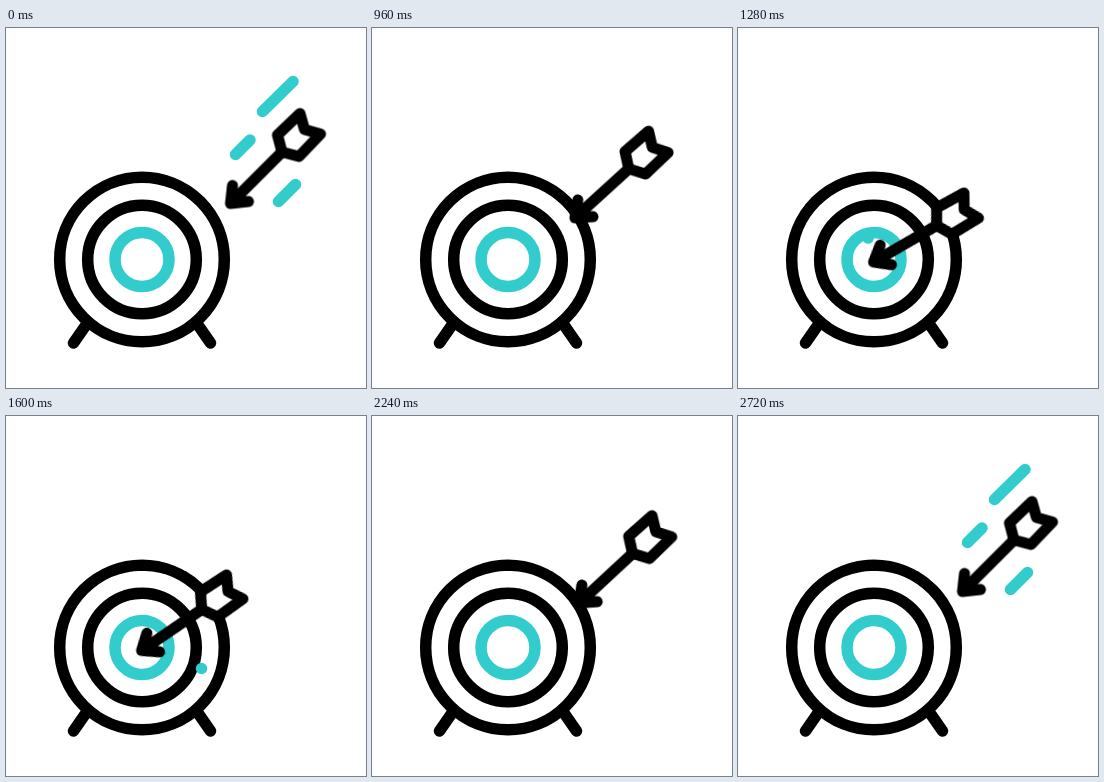
Write an HTML page that moves like this. It is 360x360 px and loops after 2760 ms.

```html
<!DOCTYPE html>
<html lang="en">
<head>
<meta charset="utf-8">
<title>Arrow and target</title>
<style>
  html, body { margin: 0; width: 100%; height: 100%; overflow: hidden; background: #fff; }
  svg {
    display: block; width: 100%; height: 100%;
    fill: none; stroke: #000; stroke-width: 11.5;
    stroke-linecap: round; stroke-linejoin: round;
  }
  .teal { stroke: #33cccc; }
  .arrow, .streak, .spark { animation: 2760ms linear infinite; }

  /* The arrow's own origin is its tip, so it quivers around the hit point. */
  .arrow { animation-name: fly; stroke-width: 11; }
  @keyframes fly {
    0% { transform: translate(224.5px, 175.5px) rotate(0deg); }
    23.19% {
      transform: translate(224.5px, 175.5px) rotate(0deg);
      animation-timing-function: cubic-bezier(.45, 0, .8, .4);
    }
    43.91% {
      transform: translate(135.6px, 234.5px) rotate(11deg);
      animation-timing-function: ease-out;
    }
    46.09% { transform: translate(135.6px, 234px) rotate(15deg); animation-timing-function: ease-in-out; }
    50.43% { transform: translate(135.6px, 234.5px) rotate(8.6deg); animation-timing-function: ease-in-out; }
    54.78% { transform: translate(135.6px, 234.5px) rotate(12.3deg); animation-timing-function: ease-in-out; }
    59.13% { transform: translate(135.6px, 234.5px) rotate(10.4deg); animation-timing-function: ease-in-out; }
    62.32% {
      transform: translate(135.6px, 234.5px) rotate(11deg);
      animation-timing-function: cubic-bezier(.25, 0, .25, 1);
    }
    98.55%, 100% { transform: translate(224.5px, 175.5px) rotate(0deg); }
  }

  .streak { animation-name: streak; }
  @keyframes streak {
    0%, 23.19% { stroke-dasharray: 1 3; visibility: visible; animation-timing-function: ease-in-out; }
    33.3%, 84% { stroke-dasharray: 0 3; visibility: hidden; animation-timing-function: ease-in-out; }
    98.55%, 100% { stroke-dasharray: 1 3; visibility: visible; }
  }

  .spark { animation-name: spark; }
  @keyframes spark {
    0%, 44.9% { stroke-dasharray: 0 3; stroke-dashoffset: 0; visibility: hidden; }
    45% { stroke-dasharray: 0 3; stroke-dashoffset: 0; visibility: visible; animation-timing-function: ease-in-out; }
    51.5% { stroke-dasharray: .6 3; stroke-dashoffset: -.2; visibility: visible; animation-timing-function: ease-in-out; }
    58%, 59.3% { stroke-dasharray: 0 3; stroke-dashoffset: -1; visibility: visible; }
    59.4%, 100% { stroke-dasharray: 0 3; stroke-dashoffset: -1; visibility: hidden; }
  }
</style>
</head>
<body>
<svg viewBox="0 0 360 360">
  <path d="M80 297 67.5 315M192 297 204.5 315"/>
  <circle cx="136" cy="231.5" r="82.3"/>
  <circle cx="136" cy="231.5" r="54.3"/>
  <circle class="teal" cx="136" cy="231.5" r="27"/>

  <g class="teal">
    <path class="streak" pathLength="1" d="M256.5 83.5 287 53.5"/>
    <path class="streak" pathLength="1" d="M229.5 126.5 244 112"/>
    <path class="streak" pathLength="1" d="M272.5 173.5 289.5 156.5"/>
    <path class="spark" pathLength="1" d="M130 211 138 162.5"/>
    <path class="spark" pathLength="1" d="M158 238 195.5 252.5"/>
  </g>

  <g class="arrow">
    <path d="M2-18 0 0 18-2M0 0 51.5-51.5"/>
    <path fill="#fff" d="M51.5-51.5 47-68.5 69.5-90 74-74 90-69.5 68.5-47Z"/>
  </g>
</svg>
</body>
</html>
```
